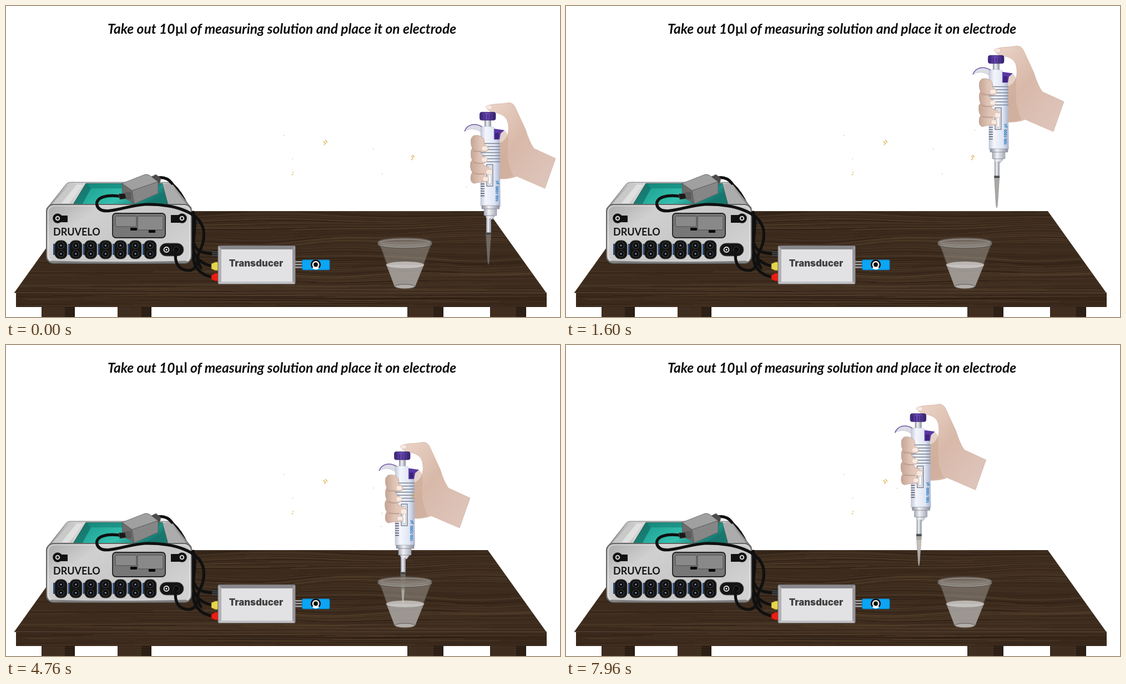
An HTML page for the animation above (8 s loop, 998 by 561 pixels).

```html
<!DOCTYPE html>
<html lang="en">
<head>
<meta charset="utf-8">
<title>Pipetting onto an electrode</title>
<style>
html, body { margin: 0; width: 100%; height: 100%; overflow: hidden; background: #fff; }
svg { display: block; width: 100vw; height: 100vh; }
text { font-variant-ligatures: none; }
.title { font: italic 700 24.5px Lato, sans-serif; text-anchor: middle; fill: #0c0c0c; }
.brand { font: 700 18px Lato, sans-serif; fill: #161616; }
.box { font: 900 16.8px Inter, sans-serif; text-anchor: middle; fill: #424242; }
.scale { font: 700 6.5px "Open Sans", sans-serif; fill: #1676c4; }
.cable { fill: none; stroke: #101010; stroke-width: 5.2; stroke-linecap: round; }
.crease { fill: none; stroke: #a98778; stroke-width: .8; }
</style>
</head>
<body>
<svg viewBox="0 0 998 561" preserveAspectRatio="none">
<defs>
  <linearGradient id="front" x2="1" y2=".6">
    <stop offset="0" stop-color="#a9a9a9"/><stop offset=".3" stop-color="#d0d0d0"/>
    <stop offset=".7" stop-color="#c6c6c6"/><stop offset="1" stop-color="#d2d2d2"/>
  </linearGradient>
  <linearGradient id="lid">
    <stop offset="0" stop-color="#8d8d8d"/><stop offset=".2" stop-color="#d4d4d4"/>
    <stop offset=".8" stop-color="#c8c8c8"/><stop offset="1" stop-color="#777"/>
  </linearGradient>
  <linearGradient id="teal" x2="1" y2=".35">
    <stop offset="0" stop-color="#116a60"/><stop offset=".2" stop-color="#1fa394"/>
    <stop offset=".65" stop-color="#34bfae"/><stop offset="1" stop-color="#16776e"/>
  </linearGradient>
  <linearGradient id="skin" x1="0" y1="0" x2="1" y2="1">
    <stop offset="0" stop-color="#ecd5c8"/><stop offset=".45" stop-color="#d8b9a9"/><stop offset="1" stop-color="#dfc7be"/>
  </linearGradient>
  <linearGradient id="finger">
    <stop offset="0" stop-color="#c5a494"/><stop offset=".5" stop-color="#dfc3b5"/><stop offset="1" stop-color="#e9d1c5"/>
  </linearGradient>
  <linearGradient id="barrel">
    <stop offset="0" stop-color="#c3c8d8"/><stop offset=".25" stop-color="#f4f6fc"/>
    <stop offset=".7" stop-color="#dfe6f4"/><stop offset="1" stop-color="#aab3cb"/>
  </linearGradient>
  <linearGradient id="metal">
    <stop offset="0" stop-color="#858a98"/><stop offset=".4" stop-color="#f1f2f6"/><stop offset="1" stop-color="#8a8f9e"/>
  </linearGradient>
  <linearGradient id="knob">
    <stop offset="0" stop-color="#3a2278"/><stop offset=".45" stop-color="#6a4ab0"/><stop offset="1" stop-color="#36206f"/>
  </linearGradient>
  <clipPath id="topClip"><path d="M120 370H868L973 517H15Z"/></clipPath>
  <clipPath id="edgeClip"><path d="M18 517H974V543H18Z"/></clipPath>
  <clipPath id="tipClip"><path d="M865 413H874L870.4 460 869.4 466H868.6L867.8 460Z"/></clipPath>
</defs>
<rect width="998" height="561" fill="#fff"/>
<text class="title" x="497" y="50">Take out 10<tspan font-style="normal">µl</tspan> of measuring solution and place it on electrode</text>

<g id="legs"></g>
<path d="M120 370H868L973 517H15Z" fill="#3d2c1e"/>
<g id="grain" clip-path="url(#topClip)" fill="none"></g>
<path d="M18 517H974V543H18Z" fill="#3a291c"/>
<g id="edge" clip-path="url(#edgeClip)" fill="none"></g>
<path d="M15 517.3H973" stroke="#5a4838"/>

<path class="cable" d="M300 322C320 340 338 380 336 400Q334 430 346 440 356 447 376 447"/>
<g id="device">
  <path d="M73 366L107 323Q110 318 117 318H290Q297 318 301 323L334 364V380H73Z" fill="url(#lid)" stroke="#777"/>
  <path d="M116 321H139L114 357H83Z" fill="#c9c9c9"/><path d="M127 322H139L114 356H100Z" fill="#e6e6e6" opacity=".8"/>
  <path d="M284 321H294L325 357H293Z" fill="#acacac"/>
  <path d="M144 320H282L292 358H121Z" fill="url(#teal)" stroke="#5b6664"/>
  <path d="M144 320L153 329H274L282 320Z" fill="#0e766c" opacity=".5"/>
  <path d="M144 320L153 329 138 357H121Z" fill="#0c554e" opacity=".5"/>
  <rect x="73" y="358" width="261" height="106" rx="13" fill="url(#front)" stroke="#666" stroke-width="2"/>
  <rect x="76" y="360.5" width="255" height="100" rx="11" fill="none" stroke="#eee" stroke-width="2" opacity=".5"/>
  <path d="M80 461Q200 464 326 461" fill="none" stroke="#808080" stroke-width="3"/>
  <path d="M94 378H111V390H94ZM297 377H317V391H297Z" fill="#111"/>
  <g fill="#d5d5d5" stroke="#111" stroke-width="4.5"><circle cx="93" cy="383" r="6.5"/><circle cx="317" cy="383" r="6.5"/></g>
  <circle cx="93" cy="383" r="2.2" fill="#111"/><circle cx="317" cy="383" r="2.2" fill="#111"/>
  <rect x="192" y="374" width="95" height="44" rx="6" fill="#777" stroke="#222" stroke-width="1.8"/>
  <g fill="#898989" stroke="#4d4d4d"><rect x="197" y="379" width="38" height="19" rx="2"/><rect x="237" y="379" width="46" height="25" rx="2"/></g>
  <path d="M224 400H236V405H224ZM257 404H269V409H257Z" fill="#090909"/>
  <text class="brand" x="85" y="414">DRUVELO</text>
  <g id="ports"></g>
  <rect x="277" y="428" width="43" height="23" rx="11.5" fill="#151515" stroke="#555"/>
  <circle cx="289" cy="439.5" r="4.5" fill="#111" stroke="#eee" stroke-width="1.8"/><circle cx="289" cy="439.5" r="1.5" fill="#fff"/>
  <circle cx="307" cy="439.5" r="5" fill="#080808" stroke="#444"/>
</g>

<g class="cable">
  <path d="M272 310C284 308 293 312 299 320M337 372C346 395 332 430 340 448Q350 466 373 469"/>
  <path d="M306 440C302 466 313 477 329 477C344 477 350 455 341 448M338 446C335 470 351 487 374 489"/>
  <path d="M210 344C182 339 160 345 164 360C172 382 213 360 250 358C300 357 350 370 356 405C360 443 334 445 351 472"/>
</g>
<g id="pod" stroke="#555" stroke-width=".7">
  <path d="M258 310L270 304 279 311 277 319 264 323Z" fill="#4b4b4b"/>
  <path d="M209 320L250 304Q254 303 258 305L274 317 227 333Z" fill="#a0a0a0"/>
  <path d="M209 320L227 333 231 357 210 343Z" fill="#6c6c6c"/>
  <path d="M227 333L274 317V338L231 357Z" fill="#868686"/>
  <path d="M203 339L216 338 219 347 205 349Z" fill="#1a1a1a"/><path d="M214 337L225 336V348L217 349Z" fill="#5c5c5c"/>
</g>

<g id="transducer">
  <path d="M371 441H382V452H371Z" fill="#222"/><path d="M371 443.500H382M371 447H382M371 450.500H382" stroke="#666"/>
  <path d="M370 465L377 462H382V477H377L370 474Z" fill="#e7d44c" stroke="#8a7918" stroke-width=".7"/>
  <path d="M370 486L377 482H382V496H377L370 493Z" fill="#ee1c12" stroke="#8b0d08" stroke-width=".7"/>
  <rect x="382" y="432.500" width="139" height="69" rx="2" fill="#b2b2b6" stroke="#777"/>
  <path d="M383 433H520L515 440H389Z" fill="#88888d"/><path d="M520 434V501L515 496V440Z" fill="#98989d"/>
  <path d="M383 501H520L515 496H389Z" fill="#c2c2c5"/>
  <rect x="388" y="439" width="128" height="58" fill="#e2e2e4"/>
  <text class="box" x="450.500" y="470">Transducer</text>
  <path d="M521 461.500H535M521 466.500H535M521 471.500H535" stroke="#77777a" stroke-width="3"/>
  <path d="M521 461H535M521 466H535M521 471H535" stroke="#ccc"/>
  <rect x="533.500" y="458" width="49.500" height="18" rx="2" fill="#0aa6f4" stroke="#087bc0"/>
  <circle cx="558" cy="466.500" r="9" fill="#f5f5f5"/>
  <path d="M552.500 472A7.800 7.800 0 1 1 563.500 472" fill="none" stroke="#0b0b0b" stroke-width="2.600"/>
  <circle cx="558" cy="466.500" r="3.900" fill="#0b0b0b"/>
</g>

<g id="pipette">
  <path d="M865 183C871 175 888 178 905 174.500Q913 174 917 182L936 223Q943 246 951 257L990 275 971 329 920 307Q910 312 889 312V248C899 244 907 234 905 216C904 202 897 196 884 193Q873 194 865 183Z" fill="url(#skin)" stroke="#d3b5a6" stroke-width=".8"/>
  <path d="M889 225Q907 219 904 252 901 282 914 307 902 312 889 311Z" fill="#c9a591" opacity=".5"/>
  <path d="M864 182Q867 177 876 180L875 186Q868 189 864 182Z" fill="#f7e9e1" stroke="#c8a594" stroke-width=".5"/>
  <path d="M826 226C831 214 844 211 858 219V229C845 220 836 220 826 226Z" fill="#dcdde6" stroke="#a4a5b4" stroke-width=".5"/>
  <path d="M826 226C831 213 845 210 858 218" fill="none" stroke="#5f44a0" stroke-width="1.300"/>
  <path d="M877 221L898 224 891 230 889 241H877Z" fill="#5937a2"/><path d="M881 229H888V240H881Z" fill="#3d2380"/>
  <path d="M862 205H874V221H862Z" fill="url(#metal)"/>
  <rect x="853.500" y="191.500" width="28.500" height="14.500" rx="3.500" fill="url(#knob)" stroke="#2c1a60" stroke-width=".7"/>
  <path d="M858 195V204M863 196V205M868 196V205M873 196V205M878 195V204" stroke="#34206e"/>
  <path d="M855 219Q867 215 879 219V241H889L890.500 361H855Z" fill="url(#barrel)" stroke="#b3b9ca" stroke-width=".5"/>
  <path id="rings" stroke="#7c8392" stroke-width="1.500"/>
  <path id="ticks" stroke="#4f5568" stroke-width="1.400"/>
  <rect x="866" y="286" width="11" height="39" fill="#e4e5eb" stroke="#6b7080" stroke-width="1.200"/>
  <path d="M869 290H874V321H869Z" fill="#fafafa" stroke="#999" stroke-width=".6"/>
  <text class="scale" transform="translate(887 353) rotate(-90)">100-1000&#160; µl</text>
  <path d="M857 360H889V366H857ZM861 366H884V378H861ZM864 378H881L876 385H866Z" fill="url(#metal)" stroke="#7d8290" stroke-width=".5"/>
  <path d="M865 383H874V409H865Z" fill="url(#metal)"/>
  <path d="M864.500 408.500H874L870.500 460 869.500 466H868.500L867.500 460Z" fill="#86837f" fill-opacity=".7" stroke="#686562" stroke-opacity=".7" stroke-width=".6"/>
  <g clip-path="url(#tipClip)"><rect id="fill" x="862" width="15" height="60" fill="#d0cdc9" opacity=".65"/></g>
  <path d="M864.500 409H874V412.500H864.500Z" fill="#44474c"/>
  <g fill="url(#finger)" stroke="#b99a8a" stroke-width=".7">
    <path d="M841 298Q852 296 862 305 870 308 869 314 866 319 857 317L843 320Q835 318 838 304Z"/>
    <path d="M841 276Q850 274 862 288 875 292 876 300 873 306 862 303L844 302Q835 299 837 282Z"/>
    <path d="M841 255Q851 254 858 270 867 273 867 280 862 286 852 283L843 281Q836 277 838 260Z"/>
    <path d="M842 234Q854 231 861 240L862 250Q870 253 869 260 863 265 853 262L842 260Q836 252 838 239Z"/>
  </g>
  <path class="crease" d="M842 262Q850 264 856 262M842 282Q852 286 859 283M843 302Q852 305 862 303"/>
  <g fill="#f8eae2" stroke="#cba897" stroke-width=".4">
    <rect x="857" y="253" width="11" height="8" rx="3.500"/><rect x="857" y="273" width="10" height="8" rx="3.500"/>
    <rect x="865" y="295" width="11" height="9" rx="3.500"/><rect x="859" y="308" width="10" height="8" rx="3.500"/>
  </g>
  <circle cx="829.500" cy="326.500" r=".8" fill="#e6c34a"/>
</g>

<g id="cup" stroke="#55504c" stroke-width=".9">
  <path d="M672 431Q677 437 679 445L700 506Q718 514 737 506L760 445Q763 435 766 431Z" fill="#aaa59f" fill-opacity=".46"/>
  <path d="M685 467L700 506Q718 514 737 506L753 467Z" fill="#adaaa7" fill-opacity=".72" stroke="none"/>
  <ellipse cx="719" cy="467" rx="34.500" ry="6" fill="#d2cfcc" fill-opacity=".78" stroke="none"/>
  <path d="M670 425V430C674 439 764 439 767 430V425Z" fill="#aaa69f" fill-opacity=".65"/>
  <ellipse cx="718.500" cy="425.500" rx="48.500" ry="7.500" fill="#827971" fill-opacity=".75"/>
  <ellipse cx="718.500" cy="426.500" rx="45" ry="5.500" fill="none" stroke="#aaa6a1"/>
  <ellipse cx="718.500" cy="506" rx="18" ry="4" fill="#c2beb9" fill-opacity=".6"/>
</g>

<g stroke="#d4a92f" stroke-width="1.100">
  <path d="M572 244L576 248M575 242L579 246M573 251L575 248M515 305L517 303M516 300H518.500"/>
  <path id="specks" d="M730 271L734 274M732 269L736 272M730 278L733 275M677 303H678.500M661 258H662.500"/>
  <path d="M500 233.500H501.500M515.500 276H517" stroke="#b9b28f"/>
</g>
</svg>
<script>
const $ = id => document.getElementById(id);
const NS = "http://www.w3.org/2000/svg";
const LOOP = 8000, STEP = 40;

function add(parent, tag, attrs) {
  const el = document.createElementNS(NS, tag);
  for (const k in attrs) el.setAttribute(k, attrs[k]);
  return parent.appendChild(el);
}

let seed = 17;
const rnd = () => (seed = seed * 16807 % 2147483647) / 2147483647;

// Fine wood fibres; those near a knot spread apart around it.
function grain(parent, y0, y1, count, knots) {
  for (let i = 0; i < count; i++) {
    const base = y0 + rnd() * (y1 - y0), phase = rnd() * 6;
    const start = rnd() * 700 - 100, end = start + 180 + rnd() * 650;
    let d = "";
    for (let x = start; x < end; x += 16) {
      let y = base + Math.sin(x / 130 + phase) * 1.1;
      for (const [kx, ky, w] of knots)
        y += (base - ky) * 0.9 * Math.exp(-(((x - kx) / w) ** 2) - ((base - ky) / 30) ** 2);
      d += (d ? "L" : "M") + x.toFixed(1) + " " + y.toFixed(1);
    }
    add(parent, "path", {
      d, stroke: rnd() < 0.5 ? "#20150d" : "#6e563c",
      "stroke-width": (0.5 + rnd() * 0.9).toFixed(2), opacity: (0.12 + rnd() * 0.25).toFixed(2)
    });
  }
}

function stripes(x0, x1, y0, gap, count) {
  let d = "";
  for (let i = 0; i < count; i++) d += `M${x0} ${y0 + i * gap}H${x1}`;
  return d;
}

function buildScene() {
  grain($("grain"), 370, 517, 230, [[585, 452, 110], [480, 400, 140], [850, 435, 120]]);
  grain($("edge"), 517, 543, 55, []);
  for (const [x, w] of [[64, 60], [201, 61], [723, 65], [872, 65]]) {
    add($("legs"), "rect", { x, y: 542, width: w, height: 22, fill: "#291c12" });
    add($("legs"), "rect", { x, y: 542, width: w - 18, height: 22, fill: "#3c2b1e" });
    add($("legs"), "path", { d: stripes(x + 2, x + w - 3, 546, 4, 4), stroke: "#5e4934", opacity: 0.35 });
  }
  for (let i = 0; i < 7; i++) {
    const x = 99 + i * 26.8;
    add($("ports"), "rect", { x: x - 14, y: 429, width: 6, height: 20, fill: "#274a7c" });
    add($("ports"), "rect", { x: x - 11, y: 423, width: 22, height: 33, rx: 9, fill: "#141414", stroke: "#303030" });
    for (const y of [432, 447]) {
      add($("ports"), "circle", { cx: x, cy: y, r: 5.5, fill: "#080808", stroke: "#444", "stroke-width": 1.2 });
      add($("ports"), "circle", { cx: x, cy: y, r: 1.8, fill: "#6c86ad" });
    }
  }
  $("rings").setAttribute("d", stripes(855, 890, 248, 5.5, 7));
  $("ticks").setAttribute("d", stripes(855, 862, 321, 4.3, 6));
}

// time, x offset, y offset
const path = [
  [0, 0, 0], [1080, -1, -103], [1950, -155, -102], [2950, -154, 1],
  [7245, -154, 1], [7480, -154, -28], [LOOP, -240, -71]
];

function position(t) {
  const i = path.findIndex(p => p[0] > t);
  const [a, b] = [path[i - 1], path[i]];
  const k = (t - a[0]) / (b[0] - a[0]);
  return [a[1] + (b[1] - a[1]) * k, a[2] + (b[2] - a[2]) * k];
}

function draw(t) {
  const [x, y] = position(t);
  $("pipette").setAttribute("transform", `translate(${x.toFixed(2)} ${y.toFixed(2)})`);
  const level = Math.min(1, Math.max(0, (t - 3400) / 2500));
  $("fill").setAttribute("y", 466 - 47 * level);
  $("specks").setAttribute("visibility", t < 7245 ? "visible" : "hidden");
}

function tick() {
  draw(Math.floor(performance.now() % LOOP / STEP) * STEP);
  requestAnimationFrame(tick);
}

buildScene();
draw(0);
requestAnimationFrame(tick);
</script>
</body>
</html>
```
